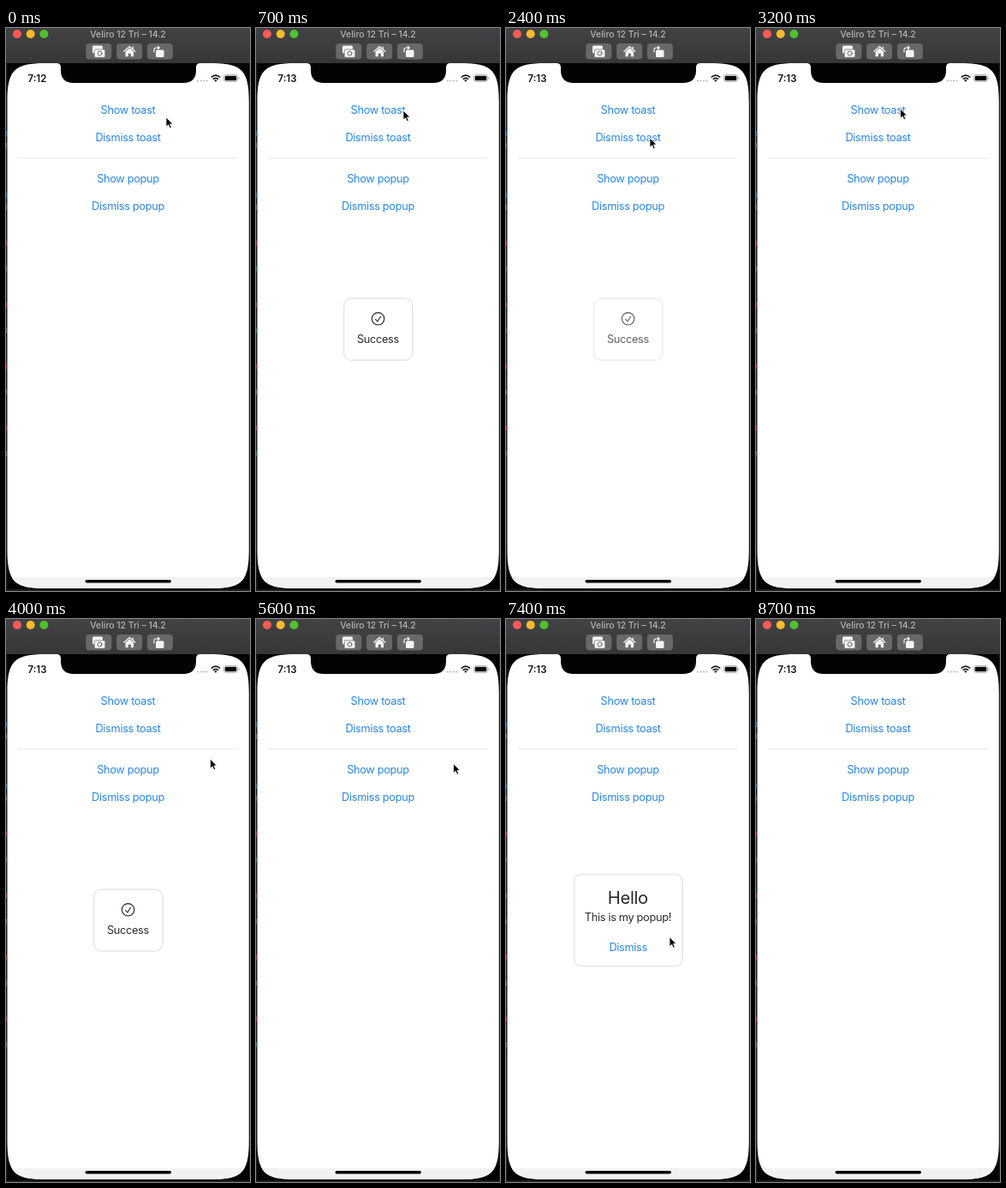
Animation, 285 px wide and 656 px high, one loop 8.9 s. Source, as an HTML page:

```html
<!DOCTYPE html>
<html lang="en">
<head>
<meta charset="utf-8">
<title>Toast and popup demo</title>
<style>
  html, body { margin: 0; width: 100%; height: 100%; overflow: hidden; background: #1c1d20; }
  svg { display: block; width: 100vw; height: 100vh; }
  text { font-family: Inter, Roboto, sans-serif; font-size: 12.8px; letter-spacing: -0.34px; text-anchor: middle; fill: #2a2a2a; }
  .title { font-size: 10.4px; font-weight: 500; letter-spacing: 0; fill: #b3b3b4; }
  .clock { font-size: 11.4px; font-weight: 600; letter-spacing: 0; text-anchor: start; fill: #111; }
  .big { font-size: 20.3px; }
  .link { fill: #2a87e2; }
  .card { fill: #fff; stroke: #ebebeb; stroke-width: 2; }
  .line { fill: none; stroke-linecap: round; stroke-linejoin: round; }
</style>
</head>
<body>
<svg viewBox="0 0 285 656" preserveAspectRatio="none">
  <defs>
    <linearGradient id="bar" x2="0" y2="1">
      <stop offset="0" stop-color="#434345"/>
      <stop offset="1" stop-color="#363638"/>
    </linearGradient>
    <clipPath id="screen"><path id="outline"/></clipPath>
  </defs>

  <rect width="285" height="656" fill="#1c1d20"/>
  <rect x="1.5" y="41" width="282.5" height="613" fill="#030303"/>
  <g id="specks"></g>

  <!-- window bar -->
  <rect width="285" height="41" fill="url(#bar)"/>
  <g id="lights"></g>
  <text class="title" x="142.5" y="11">Veliro 12 Tri – 14.2</text>
  <g id="keys" fill="#68686a"></g>
  <g fill="#f4f4f4">
    <rect x="101" y="20.5" width="12" height="9" rx="1.5"/>
    <rect x="103.2" y="25" width="12.6" height="9.3" rx="1.6" stroke="#68686a" stroke-width=".7"/>
    <circle class="line" cx="109.5" cy="29.6" r="2.5" stroke="#68686a"/>
    <path d="M139.5 27.5l4.800-4.300 4.800 4.300v5.800h-3.300v-3.600h-3v3.600h-3.300z"/>
    <path class="line" d="M137.800 27.300l6.500-5.800 6.500 5.800M148.300 22v2.500" stroke="#f4f4f4" stroke-width="1.200"/>
    <rect x="175" y="25.5" width="9.5" height="8.5" rx="1.5"/>
    <path class="line" d="M173 28v-2.500q0-2.500 2.500-2.500h2" stroke="#f4f4f4" stroke-width="1.200"/>
    <path d="M177 20.300l3.200 2.700-3.200 2.700z"/>
  </g>

  <!-- phone screen -->
  <g clip-path="url(#screen)">
    <rect y="41" width="285" height="613" fill="#fff"/>
    <rect y="640" width="285" height="14" fill="#f2f2f3"/>
    <path d="M59 41q5 0 5 5v3q0 15 15 15h128q15 0 15-15v-3q0-5 5-5z" fill="#030303"/>
    <text class="clock" id="clock" x="25.5" y="63"></text>
    <path class="line" d="M224 61.500h11" stroke="#b9b9b9" stroke-width="2.200" stroke-dasharray="0 3.500"/>
    <path d="M239.600 57.500q5.300-4.800 10.600 0M241.700 59.700q3.200-2.800 6.400 0" fill="none" stroke="#111" stroke-width="1.600"/>
    <path d="M243.200 60.900q1.700-1.300 3.400 0l-1.700 1.800z" fill="#111"/>
    <rect x="254.5" y="54.5" width="16" height="8" rx="2.3" fill="none" stroke="#a5a5a5" stroke-width=".8"/>
    <rect x="255.7" y="55.7" width="13.6" height="5.6" rx="1.3" fill="#080808"/>
    <path d="M271.500 57v3q1.200-.5 1.200-1.500t-1.200-1.500z" fill="#a5a5a5"/>

    <g id="menu"></g>
    <rect x="14" y="151" width="256.5" height="1" fill="#eaeaea"/>

    <g id="toast">
      <rect class="card" x="102.5" y="315" width="80.5" height="72" rx="9"/>
      <circle class="line" cx="142.6" cy="338.8" r="7.200" stroke="#222" stroke-width="1.1"/>
      <path class="line" d="M139.600 339.300l2.300 2.700 3.800-6" stroke="#222" stroke-width="1.1"/>
      <text x="142.4" y="366.6">Success</text>
    </g>
    <g id="popup">
      <rect class="card" x="79.5" y="297.5" width="126.5" height="107" rx="8"/>
      <text class="big" x="142.3" y="332">Hello</text>
      <text x="142.4" y="352">This is my popup!</text>
      <text class="link" x="142.7" y="387.2">Dismiss</text>
    </g>
    <rect x="92.5" y="643" width="100.5" height="3.6" rx="1.8" fill="#050505"/>
  </g>

  <path id="cursor" d="M0 0v11.200l2.600-2.400 1.800 4 1.900-.8-1.800-4h3.400z" fill="#050505" stroke="#fff" stroke-width=".8"/>
</svg>
<script>
const LOOP = 8900, STEP = 100, LAST = 8700;
const GLIDE = 400, FADE = 300, DROP = 365;
const $ = id => document.getElementById(id);
const repeat = (id, items, markup) => $(id).innerHTML = items.map(markup).join("");

// pointer stops: arrival time, tip position, and what a click there does
const stops = [
  { t: 0, at: [187, 104] },
  { t: 300, at: [172, 96], show: "toast" },
  { t: 1400, at: [187, 255] },
  { t: 1800, at: [230, 200] },
  { t: 2300, at: [168, 128], hide: "toast" },
  { t: 3200, at: [168.5, 94], show: "toast" },
  { t: 4000, at: [238.5, 163] },
  { t: 5100, at: [170, 128], hide: "toast" },
  { t: 5600, at: [230.5, 168.5] },
  { t: 6100, at: [165, 176], show: "popup" },
  { t: 6600, at: [253, 190] },
  { t: 6800, at: [170, 206], hide: "popup" },
  { t: 7000, at: [168, 176], show: "popup" },
  { t: 7400, at: [191, 370.5] },
  { t: 8000, at: [155, 386], hide: "popup" },
  { t: LAST, at: [190, -20] }
];

const ease = v => {
  const c = Math.min(1, Math.max(0, v));
  return c * c * (3 - 2 * c);
};

// each stop is reached by a short glide, the pointer rests before it
function pointer(t) {
  const i = Math.max(1, stops.findIndex(s => s.t >= t));
  const a = stops[i - 1], b = stops[i];
  const begin = Math.max(a.t, b.t - GLIDE);
  const k = ease((t - begin) / (b.t - begin));
  return a.at.map((v, j) => v + (b.at[j] - v) * k);
}

// 0 when hidden, 1 when fully shown
function presence(name, t) {
  let level = 0;
  for (const s of stops) {
    const k = ease((t - s.t) / FADE);
    if (s.show === name) level += (1 - level) * k;
    if (s.hide === name) level *= 1 - k;
  }
  return level;
}

function draw(now) {
  const t = Math.min(LAST, Math.floor(now % LOOP / STEP) * STEP);
  $("clock").textContent = t < 600 ? "7:12" : "7:13";
  $("toast").setAttribute("opacity", presence("toast", t));
  const p = presence("popup", t);
  $("popup").setAttribute("transform", `translate(0 ${(1 - p) * DROP})`);
  $("popup").setAttribute("visibility", p ? "visible" : "hidden");
  $("cursor").setAttribute("transform", `translate(${pointer(t)})`);
}

// rectangle with continuous corners: c is the corner length, k the curve handle
function smoothRect(x, y, w, h, c, k) {
  const d = c - k;
  return `M${x} ${y + c}c0 ${-d} ${k} ${-c} ${c} ${-c}h${w - 2 * c}c${d} 0 ${c} ${k} ${c} ${c}` +
    `v${h - 2 * c}c0 ${d} ${-k} ${c} ${-c} ${c}h${2 * c - w}c${-d} 0 ${-c} ${-k} ${-c} ${-c}z`;
}
$("outline").setAttribute("d", smoothRect(1.5, 41, 282.3, 612, 45, 8));

repeat("lights", ["#fc5b55", "#f7bb2d", "#4fc22f"], (c, i) =>
  `<circle cx="${13 + 15.7 * i}" cy="7" r="5" fill="${c}"/>`);
repeat("keys", [0, 1, 2], i =>
  `<rect x="${93.3 + 35.8 * i}" y="18" width="30" height="18.5" rx="4"/>`);
repeat("menu", ["Show toast", "Dismiss toast", "Show popup", "Dismiss popup"], (label, i) =>
  `<text class="link" x="142.5" y="${100 + 32.2 * i + (i > 1 ? 15.5 : 0)}">${label}</text>`);

// slivers of the window behind
repeat("specks", [0, 1, 2, 3, 4, 5], i => {
  const y = 134 + 71.8 * i, tint = i < 2 ? "#2d5f84" : "#84343c";
  return `<rect y="${y}" width="1" height="6" fill="#3a6844"/>` +
    `<rect y="${y - (i < 2 ? 14 : 30)}" width="1" height="6" fill="${tint}"/>`;
});

let start;
function tick(now) {
  start ??= now;
  draw(now - start);
  requestAnimationFrame(tick);
}
draw(0);
requestAnimationFrame(tick);
</script>
</body>
</html>
```
